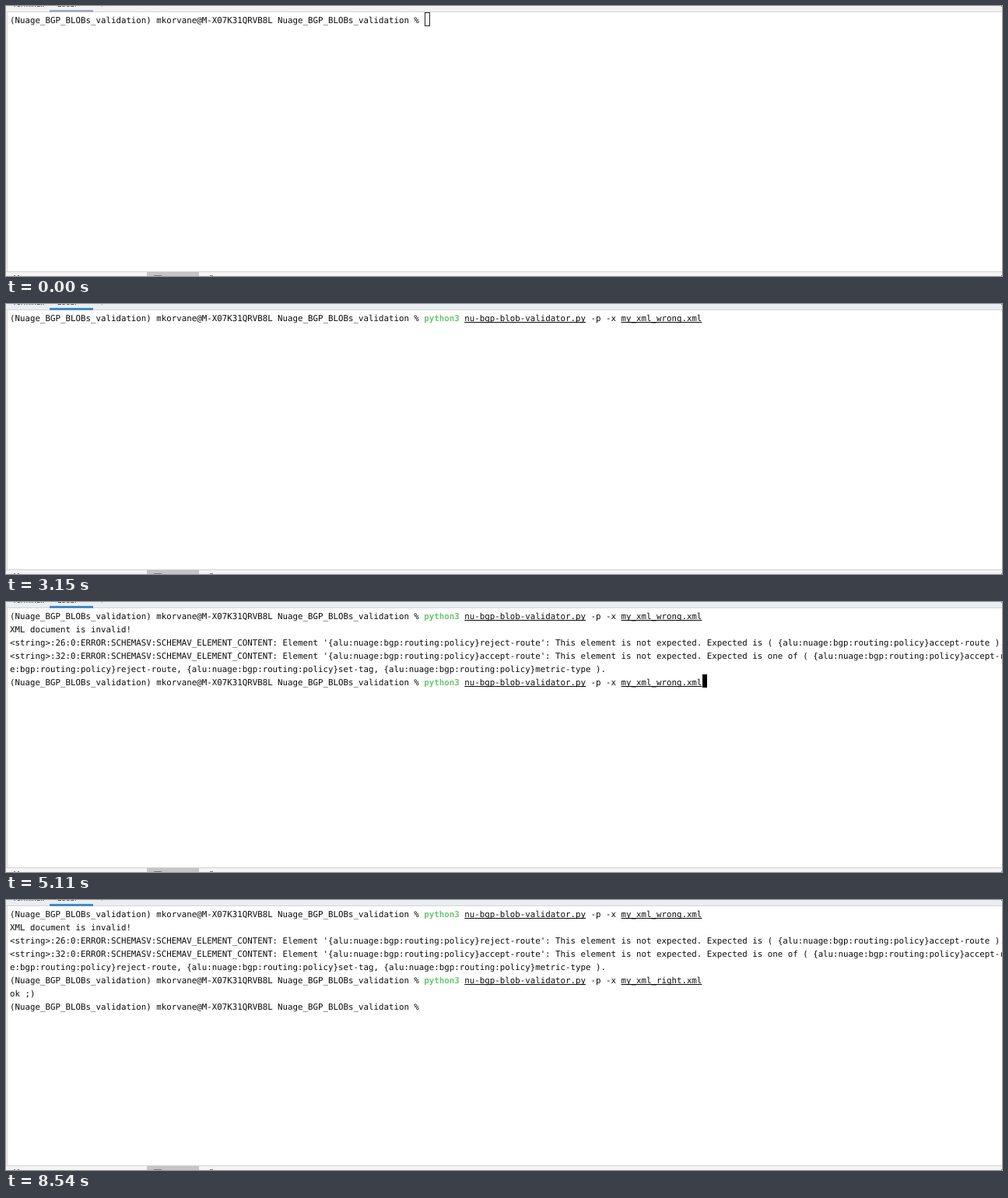
Animation of 1280x347 px, one loop 8.96 s. Source, as an HTML page:

```html
<!DOCTYPE html>
<html lang="en">
<head>
<meta charset="utf-8">
<title>Terminal</title>
<style>
html, body { margin: 0; width: 100%; height: 100%; overflow: hidden; background: #fff; }
#stage { position: relative; width: 1280px; height: 347px; overflow: hidden; background: #fff; }
#stage div, #stage i { position: absolute; }

/* window chrome */
.bar { left: 0; top: 0; width: 1280px; height: 7px; background: #f2f2f2; border-bottom: 1px solid #d3d5d7; overflow: hidden; animation: bar 8960ms step-end infinite; }
.bar div { font: 9.5px/12px Inter, sans-serif; color: #222; top: -8px; white-space: pre; }
.tab { left: 56px; top: 5px; width: 56px; height: 3px; background: #a3aebd; animation: tab 8960ms step-end infinite; }
.edge { left: 0; top: 8px; width: 1px; height: 333px; background: #f5f5f5; border-right: 1px solid #d6d6d6; }
.foot { left: 0; top: 341px; width: 1280px; height: 5px; background: #f4f4f4; border-top: 1px solid #d3d3d3; }
.foot i { height: 1px; top: 4px; background: #777; }
.foot .on { left: 181px; top: 0; width: 67px; height: 5px; background: #c5c5c5; }
.corner { left: 1279px; width: 1px; height: 1px; background: #777; }

/* terminal text */
.row {
  left: 5.1px; height: 17px; white-space: pre; color: #0b0b0b;
  font: 10.797px/17px "DejaVu Sans Mono", monospace;
  text-rendering: geometricPrecision; font-variant-ligatures: none;
}
.row span { position: absolute; left: 82ch; top: 0; }
.row b { color: #6cc573; }
.row u { text-decoration-thickness: 1px; text-underline-offset: 1px; text-decoration-skip-ink: none; }
.cursor { left: 0; top: 0; width: 6px; height: 17px; background: #000; animation: cursor 8960ms step-end infinite; }
.hollow { left: 538px; top: 8px; width: 5px; height: 16px; border: 1px solid #222; animation: hollow 8960ms step-end infinite; }

.clear1 { animation: clear1 8960ms step-end infinite; }
.run1 { animation: run1 8960ms step-end infinite; }
.out1 { animation: out1 8960ms step-end infinite; }
.clear2 { animation: clear2 8960ms step-end infinite; }
.wrong2 { animation: wrong2 8960ms step-end infinite; }
.right2 { animation: right2 8960ms step-end infinite; }
.out2 { animation: out2 8960ms step-end infinite; }

/* one percent is 89.6 ms */
@keyframes bar { 0% { background: #f2f2f2; } 6.25%, 100% { background: #e9eef2; } }
@keyframes tab { 0% { background: #a3aebd; } 6.25%, 100% { background: #4389c6; } }
@keyframes hollow { 0% { opacity: 1; } 6.25%, 100% { opacity: 0; } }
@keyframes clear1 { 0% { opacity: 0; } 18.75% { opacity: 1; } 23.4375%, 100% { opacity: 0; } }
@keyframes run1 { 0% { opacity: 0; } 23.4375%, 100% { opacity: 1; } }
@keyframes out1 { 0% { opacity: 0; } 45.3125%, 100% { opacity: 1; } }
@keyframes clear2 { 0% { opacity: 0; } 61.71875% { opacity: 1; } 68.75%, 100% { opacity: 0; } }
@keyframes wrong2 {
  0% { opacity: 0; } 57.03125% { opacity: 1; } 61.71875% { opacity: 0; }
  68.75% { opacity: 1; } 79.6875%, 100% { opacity: 0; }
}
@keyframes right2 { 0% { opacity: 0; } 79.6875%, 100% { opacity: 1; } }
@keyframes out2 { 0% { opacity: 0; } 89.0625%, 100% { opacity: 1; } }
@keyframes cursor {
  0% { opacity: 0; transform: translate(538px, 8px); }
  6.25% { opacity: 1; transform: translate(538px, 8px); }
  12.5% { opacity: 0; transform: translate(538px, 8px); }
  18.75% { opacity: 1; transform: translate(571px, 8px); }
  23.4375% { opacity: 1; transform: translate(895px, 8px); }
  35.15625% { opacity: 0; transform: translate(895px, 8px); }
  41.40625% { opacity: 1; transform: translate(895px, 8px); }
  44.53125% { opacity: 1; transform: translate(6px, 25px); }
  45.3125% { opacity: 1; transform: translate(538px, 93px); }
  50.78125% { opacity: 0; transform: translate(538px, 93px); }
  57.03125% { opacity: 1; transform: translate(895px, 93px); }
  61.71875% { opacity: 1; transform: translate(571px, 93px); }
  68.75% { opacity: 1; transform: translate(895px, 93px); }
  75.78125% { opacity: 0; transform: translate(895px, 93px); }
  79.6875% { opacity: 1; transform: translate(895px, 93px); }
  89.0625% { opacity: 1; transform: translate(538px, 127px); }
  95.3125%, 100% { opacity: 0; transform: translate(538px, 127px); }
}
</style>
</head>
<body>
<div id="stage">
  <div class="bar">
    <div style="left:8px">Terminal:</div>
    <div style="left:66px">Local</div>
    <div style="left:120px">+</div>
  </div>
  <div class="tab"></div>
  <div class="edge"></div>
  <div class="foot">
    <i class="on"></i>
    <i style="left:10px;width:2px"></i>
    <i style="left:15px;width:2px"></i>
    <i style="left:190px;width:10px"></i>
    <i style="left:262px;width:4px"></i>
  </div>
  <i class="corner" style="top:0"></i>
  <i class="corner" style="top:346px"></i>

  <div class="row" style="top:10px">(Nuage_BGP_BLOBs_validation) mkorvane@M-X07K31QRVB8L Nuage_BGP_BLOBs_validation % <span class="clear1"><b>clear</b></span><span class="run1"><b>python3</b> <u>nu-bgp-blob-validator.py</u> -p -x <u>my_xml_wrong.xml</u></span></div>
  <div class="row out1" style="top:27px">XML document is invalid!</div>
  <div class="row out1" style="top:44px">&lt;string&gt;:26:0:ERROR:SCHEMASV:SCHEMAV_ELEMENT_CONTENT: Element '{alu:nuage:bgp:routing:policy}reject-route': This element is not expected. Expected is ( {alu:nuage:bgp:routing:policy}accept-route ).</div>
  <div class="row out1" style="top:61px">&lt;string&gt;:32:0:ERROR:SCHEMASV:SCHEMAV_ELEMENT_CONTENT: Element '{alu:nuage:bgp:routing:policy}accept-route': This element is not expected. Expected is one of ( {alu:nuage:bgp:routing:policy}accept-route, {alu:nuag</div>
  <div class="row out1" style="top:78px">e:bgp:routing:policy}reject-route, {alu:nuage:bgp:routing:policy}set-tag, {alu:nuage:bgp:routing:policy}metric-type ).</div>
  <div class="row out1" style="top:95px">(Nuage_BGP_BLOBs_validation) mkorvane@M-X07K31QRVB8L Nuage_BGP_BLOBs_validation % <span class="clear2"><b>clear</b></span><span class="wrong2"><b>python3</b> <u>nu-bgp-blob-validator.py</u> -p -x <u>my_xml_wrong.xml</u></span><span class="right2"><b>python3</b> <u>nu-bgp-blob-validator.py</u> -p -x <u>my_xml_right.xml</u></span></div>
  <div class="row out2" style="top:112px">ok ;)</div>
  <div class="row out2" style="top:129px">(Nuage_BGP_BLOBs_validation) mkorvane@M-X07K31QRVB8L Nuage_BGP_BLOBs_validation % </div>

  <div class="hollow"></div>
  <div class="cursor"></div>
</div>
</body>
</html>
```
